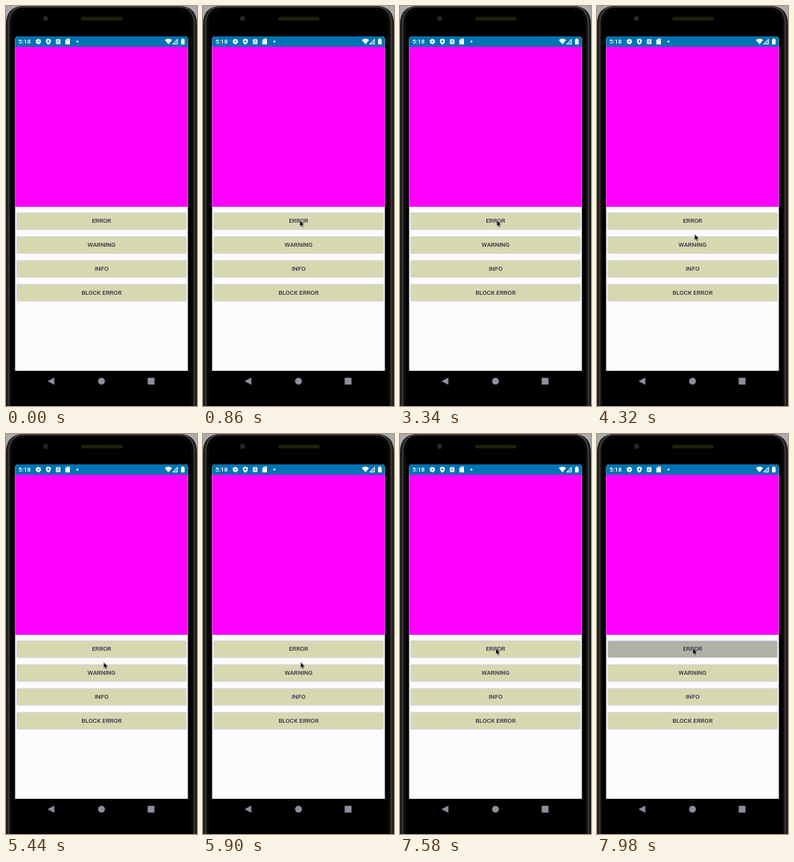
Animation, 239 px wide and 500 px high, one loop 8000 ms. Source, as an HTML page:

```html
<!DOCTYPE html>
<html lang="en">
<head>
<meta charset="utf-8">
<title>Phone demo</title>
<style>
  html, body { margin: 0; width: 100%; height: 100%; overflow: hidden; background: #000; }
  svg { display: block; width: 239px; height: 500px; }
  text { font-family: Roboto, sans-serif; }
  .label { font-size: 7.75px; font-weight: 500; fill: #34344c; text-anchor: middle; }
</style>
</head>
<body>
<svg viewBox="0 0 239 500">
  <!-- Phone body -->
  <rect width="239" height="500" fill="#acacb0"/>
  <path d="M0 500V23Q0 0 23 0H216Q239 0 239 23V500Z" fill="#1d1d19"/>
  <path d="M3.5 500V23Q3.5 1 23 1H216Q235.5 1 235.5 23V500" fill="#000" stroke="#3b3b3d" stroke-width="2"/>
  <path d="M6 500V24Q6 4 23 4M233 500V24Q233 4 216 4" fill="none" stroke="#16160d"/>
  <circle cx="49.5" cy="15.5" r="3.4" fill="#1c1c20"/>
  <circle cx="49.5" cy="15.5" r="1.7" fill="#2c2c48"/>
  <rect x="94" y="13.5" width="52" height="4.5" rx="2.2" fill="#202009"/>

  <!-- Screen -->
  <path d="M11.4 456V42Q11.4 38 15.4 38H223.6Q227.6 38 227.6 42V456Z" fill="#fcfcff"/>
  <path d="M11.4 51V42Q11.4 38 15.4 38H223.6Q227.6 38 227.6 42V51Z" fill="#0073b3"/>
  <rect x="11.4" y="51" width="216.2" height="200" fill="#f0f"/>

  <!-- Status bar -->
  <g fill="#fff">
    <text x="15.5" y="47.4" font-size="7.9" font-weight="500">5:18</text>
    <circle cx="40.5" cy="44.4" r="1.9" fill="none" stroke="#fff" stroke-width="1.8"/>
    <circle cx="40.5" cy="44.4" r="2.9" fill="none" stroke="#fff" stroke-width="1.2" stroke-dasharray="1.55 1.487"/>
    <path d="M53 40.8L56 42V44.3Q55.8 47 53 48.2Q50.2 47 50 44.3V42Z"/>
    <circle cx="53" cy="44.3" r="1.2" fill="#0073b3"/>
    <rect x="62.5" y="41.4" width="5.6" height="6.2" rx=".6"/>
    <path d="M64 46.3L65.3 42.8L66.6 46.3" fill="none" stroke="#0073b3" stroke-width=".7"/>
    <path d="M76.3 40.8H80V48H74.3V42.8Z"/>
    <path d="M76.7 41.8V43.2M78.4 41.8V43.2" stroke="#0073b3" stroke-width=".6"/>
    <circle cx="89.4" cy="44.4" r="1.2"/>
    <path d="M198.8 42.4Q203.3 39 207.8 42.4L203.3 48Z"/>
    <path d="M215 40.8V47.8H208Z" fill-opacity=".35"/>
    <path d="M214.6 41.4V47.5H208.6Z" fill="none" stroke="#fff" stroke-width=".8"/>
    <path d="M219 41.5H220.3V40.6H222.2V41.5H223.5V48H219Z"/>
  </g>

  <g id="buttons"></g>

  <!-- Navigation bar -->
  <g fill="#918ca0">
    <path d="M52 469L60.5 464.4V473.6Z"/>
    <circle cx="119.5" cy="469" r="4.3"/>
    <rect x="177.3" y="464.8" width="8.5" height="8.5" rx=".6"/>
  </g>

  <path id="cursor" d="M0 0V7.5L1.7 6L2.9 8.7L4.2 8.1L3 5.5H5.3Z" fill="#000" stroke="#e8e8ee" stroke-width=".4"/>
</svg>
<script>
const LOOP = 8000;
const IDLE = { fill: '#d8d8b0' };
const PRESSED = { fill: '#b0b1a7' };
const buttons = document.getElementById('buttons');

function add(tag, attrs) {
  const node = document.createElementNS('http://www.w3.org/2000/svg', tag);
  for (const key in attrs) node.setAttribute(key, attrs[key]);
  return buttons.appendChild(node);
}

const faces = ['ERROR', 'WARNING', 'INFO', 'BLOCK ERROR'].map((name, i) => {
  const y = 258.5 + i * 29.8;
  const face = add('rect', {
    x: 13.4, y, width: 212.4, height: 21, rx: 1.5,
    ...IDLE, stroke: '#d2cfe2', 'stroke-width': .8
  });
  add('text', { class: 'label', x: 119.6, y: y + 12.8 }).textContent = name;
  return face;
});

function play(node, frames) {
  node.animate(frames.map(([ms, style]) => ({ offset: ms / LOOP, ...style })),
    { duration: LOOP, iterations: Infinity });
}

const at = (x, y, opacity = 1) => ({
  transform: `translate(${x}px, ${y}px)`, opacity, easing: 'ease-in-out'
});

play(document.getElementById('cursor'), [
  [0, at(196, 458, 0)], [400, at(196, 458, 0)], [400, at(196, 458)],
  [820, at(121.3, 268)], [3500, at(121.3, 268)],
  [4000, at(122.2, 285.3)], [5860, at(122.2, 285.3)],
  [6350, at(120, 268)], [8000, at(120, 268)]
]);

play(faces[0], [[0, IDLE], [7800, IDLE], [7960, PRESSED], [8000, PRESSED]]);
</script>
</body>
</html>
```
